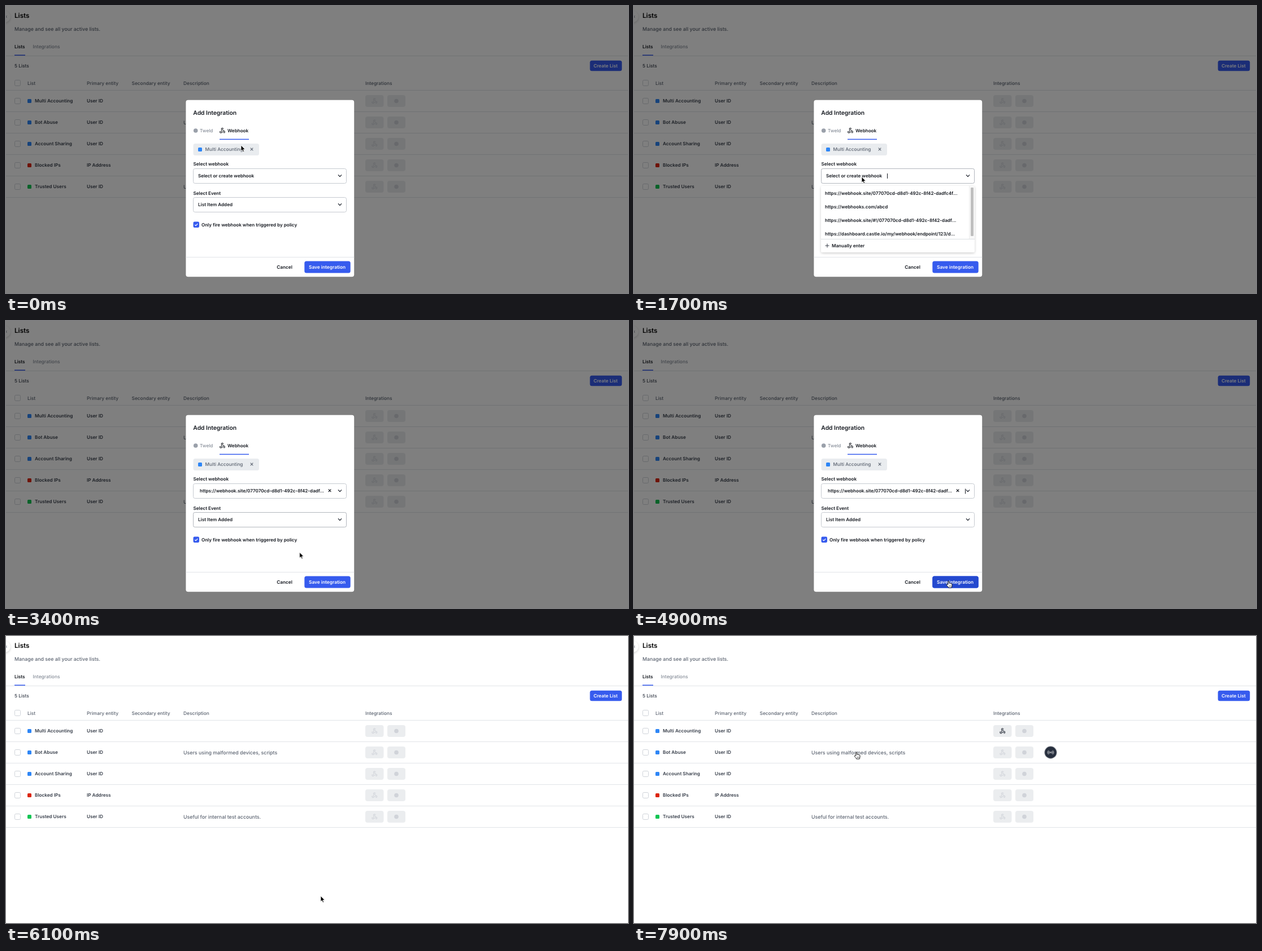
An HTML page that plays this animation: 1101x509 px, repeating every 8 s.

```html
<!DOCTYPE html>
<html lang="en">
<head>
<meta charset="utf-8">
<title>Lists</title>
<style>
  html, body { margin: 0; width: 100%; height: 100%; overflow: hidden; background: #fff; }
  svg { display: block; width: 100%; height: 100%; }
  text { font-family: Inter, "Noto Sans", sans-serif; white-space: pre; text-rendering: geometricPrecision; }
  .timed { animation: 8s step-end infinite; }
  #cursor { animation: move 8s linear infinite; }
  #badge { animation: hover-row 8s step-end infinite; }

  @keyframes move {
    0%, 1.25% { transform: translate(416px, 247px); animation-timing-function: ease-in-out; }
    11.25%, 21.25% { transform: translate(403px, 303px); animation-timing-function: ease-in-out; }
    28.75%, 38.75% { transform: translate(402px, 330px); }
    40% { transform: translate(420px, 340px); }
    41.25% { transform: translate(470px, 373px); }
    42.5% { transform: translate(519.5px, 410px); animation-timing-function: ease-out; }
    50%, 92.5% { transform: translate(557px, 461px); }
    93.75% { transform: translate(545px, 440px); }
    95% { transform: translate(500px, 380px); }
    96.25% { transform: translate(450px, 310px); }
    97.5% { transform: translate(412px, 245px); }
    98.75%, 100% { transform: translate(394px, 206px); }
  }
  @keyframes hover-row {
    0% { transform: translate(737.5px, 320.5px); }
    97.5% { transform: translate(737.5px, 244.5px); }
    98.75%, 100% { transform: translate(737.5px, 206.5px); }
  }
</style>
</head>
<body>
<svg id="stage" viewBox="0 0 1101 509" preserveAspectRatio="none">
  <defs>
    <filter id="soft" x="-20%" y="-20%" width="140%" height="150%">
      <feDropShadow dx="0" dy="1.5" stdDeviation="2" flood-opacity=".2"/>
    </filter>
    <clipPath id="options"><rect x="331" y="319" width="263" height="94"/></clipPath>
    <g id="hook" fill="none" stroke-width="2.3" stroke-linecap="round" stroke-linejoin="round">
      <path transform="scale(.44) translate(-12 -12)" d="M18 17h-6c-1.1 0-1.9.9-2.5 1.9A4 4 0 1 1 2.6 15M6 17l3.1-5.8c.5-1 .1-2.2-.5-3.1a4 4 0 1 1 6.9-4M12 6l3.1 5.7c.6 1 1.8 1.3 2.9 1.3a4 4 0 0 1 0 8"/>
    </g>
    <path id="chevron" d="M-3-1.6 0 1.6 3-1.6" fill="none" stroke="#1c212b" stroke-width="1.3"/>
    <path id="cross" d="M-2.3-2.3 2.3 2.3M2.3-2.3-2.3 2.3" fill="none" stroke-width="1.1"/>
  </defs>
</svg>
<script>
const LOOP = 8000;
const INK = '#14181f', CELL = '#363d49', MUTED = '#5b6370', PALE = '#868d98', BLUE = '#365bee';
const css = [];
let count = 0;

const text = (x, y, label, size = 8.1, weight = 600, fill = INK) =>
  `<text x="${x}" y="${y + size * .36}" font-size="${size}" font-weight="${weight}" fill="${fill}">${label}</text>`;
const rect = (x, y, w, h, fill, r = 0, extra = '') =>
  `<rect x="${x}" y="${y}" width="${w}" height="${h}" rx="${r}" fill="${fill}" ${extra}/>`;
const use = (id, x, y, stroke = '') => `<use href="#${id}" x="${x}" y="${y}" stroke="${stroke}"/>`;
const line = (x1, x2, y, color = '#e1e4e8') => `<path d="M${x1} ${y}H${x2}" stroke="${color}"/>`;
const dot = (x, y, fill, r) => `<circle cx="${x}" cy="${y}" r="${r}" fill="${fill}"/>`;

// Shows the markup only during the given [from, to) spans in ms.
function during(spans, markup) {
  const name = `show${count++}`;
  const at = (ms, on) => `${ms / LOOP * 100}% { opacity: ${on} }`;
  const steps = spans.flatMap(([from, to]) => to < LOOP ? [at(from, 1), at(to, 0)] : [at(from, 1)]);
  if (spans[0][0] > 0) steps.unshift(at(0, 0));
  css.push(`@keyframes ${name} { ${steps.join(' ')} }`);
  return `<g class="timed" style="animation-name:${name}">${markup}</g>`;
}

const checkbox = y => rect(15.5, y - 5, 10, 10, '#fff', 2, 'stroke="#cfd3d9"');
const swatch = (x, y, fill) => rect(x, y - 3.5, 7, 7, fill, 1.5);

function row([name, entity, color, note], i) {
  const y = 168.5 + i * 38;
  return checkbox(y) + swatch(38, y, color) +
    text(51, y, name, 8.2, 600, CELL) + text(143, y, entity, 8.2, 600, CELL) +
    text(314, y + .3, note, 8.8, 500, MUTED) +
    rect(636, y - 10.5, 32.5, 21, '#ebedef', 4) + rect(675, y - 10.5, 32, 21, '#ebedef', 4) +
    use('hook', 652.3, y, '#d0d3d9') + dot(691, y, '#d0d3d9', 3.8) +
    line(0, 1101, y + 19);
}

function page() {
  const rows = [
    ['Multi Accounting', 'User ID', '#2e86f6', ''],
    ['Bot Abuse', 'User ID', '#2e86f6', 'Users using malformed devices, scripts'],
    ['Account Sharing', 'User ID', '#2e86f6', ''],
    ['Blocked IPs', 'IP Address', '#dc260c', ''],
    ['Trusted Users', 'User ID', '#10c553', 'Useful for internal test accounts.'],
  ];
  const heads = [[38, 'List'], [143, 'Primary entity'], [222.5, 'Secondary entity'],
    [314, 'Description'], [636, 'Integrations']];
  return rect(0, 0, 1101, 509, '#fff') +
    `<g filter="url(#soft)">${dot(-2.5, 19, '#fff', 10)}</g>` +
    '<path d="M1.5 17 0 19l1.5 2" fill="none" stroke="#868d98"/>' +
    text(15, 16.5, 'Lists', 11.7, 600, '#000') +
    text(15, 41, 'Manage and see all your active lists.', 8.8, 500, MUTED) +
    text(15, 72, 'Lists', 8.2, 600) + text(47.5, 72, 'Integrations', 8.45, 500, PALE) +
    line(0, 1101, 88.5) + rect(15, 86.5, 19, 1.5, BLUE) +
    text(15, 106.3, '5 Lists', 8.3, 500, CELL) +
    rect(1033.6, 96.8, 56.6, 18.5, BLUE, 3.5) + text(1040, 106.3, 'Create List', 8.2, 600, '#fff') +
    checkbox(136.5) + heads.map(([x, label]) => text(x, 136.5, label, 8.35, 500, MUTED)).join('') +
    line(0, 1101, 149.5) + rows.map(row).join('') +
    during([[6700, LOOP]], use('hook', 652.3, 168.5, '#1f2530'));
}

function select(y, hoverSpans) {
  const box = stroke => rect(331.5, y - 13, 271, 26, '#fff', 3, `stroke="${stroke}"`);
  return box('#c6cad0') + during(hoverSpans, box('#b3b7bd')) + use('chevron', 591, y - .5);
}

function menu() {
  const links = [
    'https://webhook.site/077070cd-d8d1-492c-8f42-dadfc4f...',
    'https://webhooks.com/abcd',
    'https://webhook.site/#!/077070cd-d8d1-492c-8f42-dadf...',
    'https://dashboard.castle.io/my/webhook/endpoint/123/d...',
  ];
  return rect(331, 319, 272, 118, '#fff', 3, 'filter="url(#soft)"') +
    during([[2000, 2700]], rect(331, 320, 263, 24, '#f1f3f5')) +
    `<g clip-path="url(#options)">${links.map((s, i) => text(338, 332.3 + 24 * i, s, 8.1)).join('')}</g>` +
    rect(593.5, 319, 9.5, 94, '#f8f8f8') + rect(593, 319, .6, 94, '#e4e4e4') +
    rect(596, 322, 5, 86, '#bfbfbf', 1) + line(331, 603, 413.5, '#dcdfe3') +
    '<path d="M338.5 425h7M342 421.5v7" stroke="#363d49"/>' + text(350, 425, 'Manually enter');
}

function modal() {
  const save = fill => rect(528.3, 452.6, 81.4, 21, fill, 3.5);
  const caret = (x, y) => rect(x, y, 1, 9, INK);
  return rect(0, 0, 1101, 509, '#000', 0, 'opacity=".5"') +
    rect(318.4, 166.8, 297.8, 313.4, '#fff', 4) +
    text(331.3, 189.7, 'Add Integration', 10.3, 600) +
    dot(335.7, 221, '#9aa0aa', 3.8) + text(343, 221, 'Tweld', 8.2, 500, PALE) +
    use('hook', 383, 221, INK) + text(392, 221, 'Webhook', 8.1, 600) +
    rect(378, 235.7, 52, 1.5, BLUE) +
    rect(331.5, 244, 116.5, 21, '#e9ecef', 3.5) + swatch(340, 254.5, '#2e86f6') +
    text(352.5, 254.5, 'Multi Accounting', 8.25, 500, MUTED) + use('cross', 435, 254, '#5b6370') +
    text(331.5, 280.5, 'Select webhook') + select(301.5, [[800, 2700]]) +
    during([[0, 2700]], text(340, 301.5, 'Select or create webhook', 8.05)) +
    during([[1100, 1800], [2300, 2700]], caret(448, 297)) +
    during([[2700, LOOP]],
      text(343, 301, 'https://webhook.site/077070cd-d8d1-492c-8f42-dadf...', 8.05) + use('cross', 573, 300.7, INK)) +
    during([[2700, 3200], [3700, 4200], [4700, 5200]], caret(586, 297.5)) +
    text(331.5, 331.7, 'Select Event') + select(352.5, [[3200, 3500]]) +
    text(340, 352.5, 'List Item Added', 8.1) +
    rect(331.5, 382.5, 10.5, 10.5, BLUE, 2.3) +
    '<path d="M334.3 388l1.7 1.7 3.3-3.5" fill="none" stroke="#fff" stroke-width="1.2"/>' +
    text(346, 388.3, 'Only fire webhook when triggered by policy', 8.05) +
    line(318.4, 616.2, 445.5) + text(479.3, 463, 'Cancel', 8.2) +
    save(BLUE) + during([[3700, 6100]], save('#2449cf')) +
    text(536, 463, 'Save integration', 8.3, 600, '#fff') +
    during([[1100, 2700]], menu());
}

function badge() {
  const arcs = '<path d="M-2-2.1a3 3 0 0 0 0 4.2M2-2.1a3 3 0 0 1 0 4.2M-3.6-3.4a5 5 0 0 0 0 6.8M3.6-3.4a5 5 0 0 1 0 6.8" fill="none" stroke="#fff" stroke-width=".9"/>';
  return `<g id="badge">${dot(0, 0, '#262e3d', 10.7)}${dot(0, 0, '#fff', 1.1)}${arcs}</g>`;
}

function cursor() {
  const arrow = '<path d="M0 0V10.2L2.3 8.1 3.9 11.8 5.6 11.1 4 7.4H7.2Z" fill="#000" stroke="#fff" stroke-width=".8"/>';
  const hand = '<path d="M-1.2 6.6V1.1C-1.2-.2.8-.2.8 1.1V4.2C1.4 3.5 2.6 3.8 2.7 4.6 3.4 4 4.4 4.4 4.5 5.2 5.2 4.8 6 5.2 6 6V8.6C6 10 5.3 10.7 5.2 12H-.3C-.5 10.6-3 8.6-3.7 7.2-4.2 6.2-2.9 5.5-2.2 6.1Z" fill="#fff" stroke="#000" stroke-width=".9"/><path d="M1 8.2v2M2.6 8.2v2M4.2 8.2v2" stroke="#000" stroke-width=".6"/>';
  return `<g id="cursor">${during([[0, 3700], [5200, 7700]], arrow)}${during([[3700, 5200], [7700, LOOP]], hand)}</g>`;
}

const scene = page() + during([[7700, LOOP]], badge()) + during([[0, 6100]], modal()) + cursor();
document.head.insertAdjacentHTML('beforeend', `<style>${css.join('\n')}</style>`);
document.getElementById('stage').insertAdjacentHTML('beforeend', scene);
</script>
</body>
</html>
```
